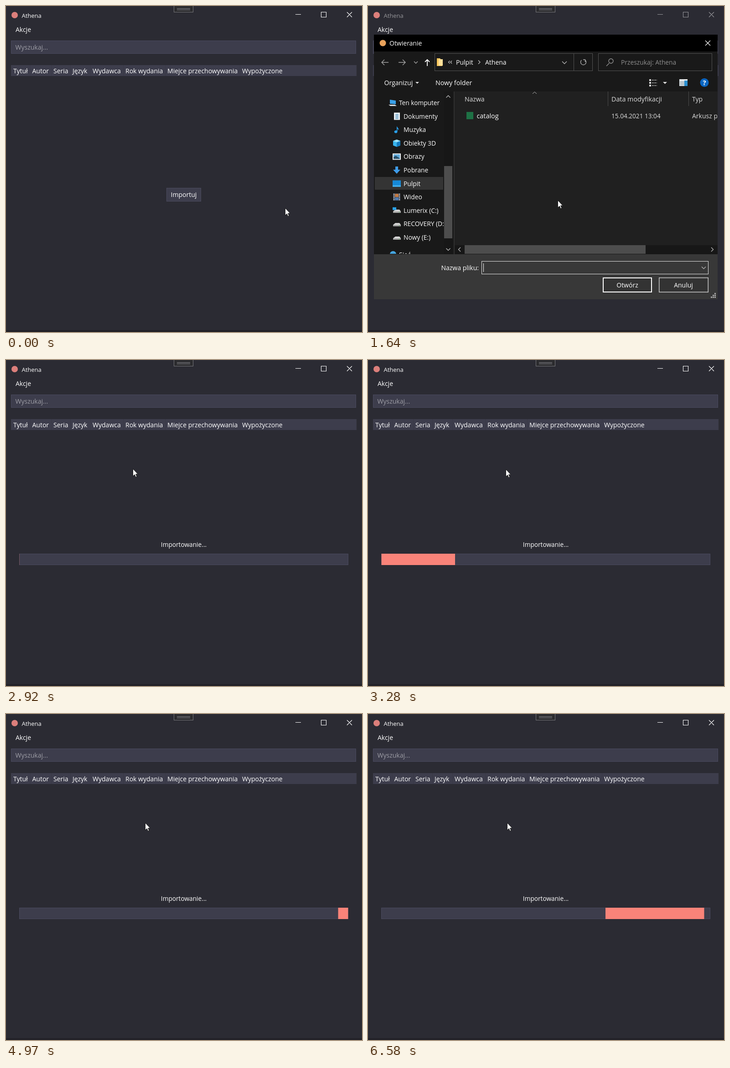
Recreate the animation shown at these times as an HTML page. Size 781 by 717 pixels, loop 6650 ms.

```html
<!DOCTYPE html>
<html lang="pl">
<head>
<meta charset="utf-8">
<title>Athena</title>
<style>
  html, body { margin: 0; width: 100%; height: 100%; overflow: hidden; background: #2b2b33; }
  svg { display: block; }
  text { font-family: "Open Sans", "Noto Sans", sans-serif; white-space: pre; }
</style>
</head>
<body>
<svg id="stage" width="781" height="717" viewBox="0 0 781 717"></svg>
<script>
const LOOP = 6650;
const ACCENT = '#f98379', LAYER = '#3d3d4c', EDGE = '#4a4a5e';

const text = (x, y, s, size = 14, fill = '#fff', more = '') =>
  `<text x="${x}" y="${y}" font-size="${size}" fill="${fill}" ${more}>${s}</text>`;
const rect = (x, y, w, h, fill, more = '') =>
  `<rect x="${x}" y="${y}" width="${w}" height="${h}" fill="${fill}" ${more}/>`;
const box = (x, y, w, h, fill, stroke, width = 1) =>
  rect(x + width / 2, y + width / 2, w - width, h - width, fill, `stroke="${stroke}" stroke-width="${width}"`);
const line = (d, stroke = '#fff', width = 1, more = '') =>
  `<path d="${d}" fill="none" stroke="${stroke}" stroke-width="${width}" ${more}/>`;
const shape = (d, fill, more = '') => `<path d="${d}" fill="${fill}" ${more}/>`;
const dot = (x, y, r, fill) => `<circle cx="${x}" cy="${y}" r="${r}" fill="${fill}"/>`;
const clip = (id, x, y, w, h) => `<clipPath id="${id}">${rect(x, y, w, h, '#000')}</clipPath>`;

function mainWindow() {
  const heads = [[16, 'Tytuł'], [57.5, 'Autor'], [104, 'Seria'], [146, 'Język'], [190, 'Wydawca'],
    [262, 'Rok wydania'], [354, 'Miejce przechowywania'], [518, 'Wypożyczone']];
  return rect(0, 0, 781, 717, '#2b2b33') +
    rect(0, 713, 781, 4, '#222128') +
    dot(19, 20, 7, '#dc7f7b') +
    `<g id="caption">${text(34.5, 25.5, 'Athena', 13, 'currentColor')}` +
    line('M635 18.5H647M691.5 13.5H702.5V24.5H691.5ZM748 13.5L759 24.5M759 13.5L748 24.5', 'currentColor', 1.1) + '</g>' +
    box(368, -2, 43, 16, '#2b2b2e', '#77777b') +
    line('M375 5.5H404M375 8.5H404', '#8b8b8f') +
    text(21, 57, 'Akcje') +
    box(11, 76, 757, 29, LAYER, EDGE) +
    text(20.5, 96, 'Wyszukaj...', 14, '#9d9da5') +
    rect(11, 130, 758, 24, LAYER) +
    heads.map(([x, s], i) => (i ? rect(x - 5, 130, 1, 24, '#383846') : '') + text(x, 147.5, s)).join('');
}

function importer() {
  return `<g id="button">${box(352, 400, 76, 30, LAYER, EDGE)}
    <rect id="hover" x="352" y="400" width="76" height="30" fill="#4b4b5d"/>
    <circle id="ripple" cx="416" cy="427" fill="${ACCENT}" clip-path="url(#btn)"/>
    ${text(390, 420, 'Importuj', 14, '#fff', 'text-anchor="middle"')}</g>
    <g id="progress">${text(390, 410.5, 'Importowanie...', 13.7, '#fff', 'text-anchor="middle"')}
    ${box(29, 426, 722, 25, LAYER, EDGE)}
    <rect id="bar" y="426" width="216.5" height="25" fill="${ACCENT}" clip-path="url(#track)"/></g>`;
}

// Sidebar icons, each drawn around its own centre
const drive = shape('M-8 2L-3 -2H6L9 2V5H-8Z', '#d8d8d8') + rect(-8, 2, 17, 3, '#a9a9a9') + rect(5, 3, 2, 1, '#4a4');
const icons = {
  pc: shape('M-6 -7L7 -5V3L-6 2Z', '#3aa0e8') + shape('M-9 4L5 4L9 7H-5Z', '#d5dbe0'),
  doc: rect(-6, -8, 13, 16, '#eef3f6') + line('M-3 -4H4M-3 -1H4M-3 2H4M-3 5H4', '#4d8fbd', 1.3),
  music: shape('M0 -8C1 -4 6 -3 4 2C4 -1 2 -2 1.500 -2V4A3.500 3 0 1 1 0 2Z', '#2aa1ee'),
  cube: shape('M0 -8L8 -5V5L0 8L-8 5V-5Z', '#39b5ee') + shape('M0 -2L8 -5V5L0 8Z', '#1379bd') + shape('M0 -8L8 -5L0 -2L-8 -5Z', '#9ce2fa'),
  image: rect(-9, -7, 18, 14, '#eef2f4') + rect(-7, -5, 14, 10, '#5fa9d8') + shape('M-7 5V1L-2 -2L7 4V5Z', '#28506a'),
  down: shape('M-3 -8H3V-1H8L0 8L-8 -1H-3Z', '#3e9be8'),
  desk: rect(-9, -7, 18, 14, '#1689d8') + rect(-9, 4, 18, 3, '#49b5f2'),
  film: rect(-8, -8, 16, 16, '#3e4654') + rect(-4, -7, 8, 7, '#c27b45') + rect(-4, 1, 8, 6, '#507bb0') +
    line('M-6 -7V8M6 -7V8', '#ddd', 2, 'stroke-dasharray="2 2"'),
  system: drive + rect(-9, -7, 8, 6, '#2aa4ee'),
  drive,
  net: dot(1, 0, 7, '#45a5df') + shape('M-9 3H0V9H-9Z', '#d5dbe0')
};

function sidebar() {
  const items = [['doc', 'Dokumenty'], ['music', 'Muzyka'], ['cube', 'Obiekty 3D'], ['image', 'Obrazy'],
    ['down', 'Pobrane'], ['desk', 'Pulpit'], ['film', 'Wideo'], ['system', 'Lumerix (C:)'],
    ['drive', 'RECOVERY (D:)'], ['drive', 'Nowy (E:)']];
  const icon = (name, x, y) => `<g transform="translate(${x} ${y})">${icons[name]}</g>`;
  return rect(15, 188, 173, 358, '#191919') + '<g clip-path="url(#side)">' +
    rect(15, 376, 150, 28, '#343434') +
    icon('pc', 54, 213) + text(68, 218, 'Ten komputer', 13.7) +
    items.map(([name, s], i) => {
      const y = 242.5 + i * 29.6;
      return icon(name, 63, y) + text(78, y + 5, s, 13.8);
    }).join('') +
    icon('net', 54, 546) + text(68, 552, 'Sieć') + '</g>' +
    rect(167, 188, 19, 358, '#171717') + rect(167, 352, 18, 159, '#4d4d4d') +
    line('M171.500 201.500L176 197L180.500 201.500M171.500 533L176 537.500L180.500 533', '#bbb', 1.3) +
    rect(188, 188, 2, 358, '#303030');
}

function navigation() {
  return rect(13, 63, 754, 37, '#000') + dot(32.5, 81.5, 7, '#e9a25b') +
    text(47, 86.500, 'Otwieranie') +
    line('M740 76L751 87M751 76L740 87', '#fff', 1.2) +
    line('M45 124H30M36 118L30 124L36 130M67 124H82M76 118L82 124L76 130', '#a5a5a5', 1.4) +
    line('M101 122L105 126L109 122', '#aaa', 1.3) +
    line('M130 132V118M125 123L130 118L135 123', '#fff', 1.8) +
    box(146, 104, 347, 39, '#191919', '#535353') + box(505, 104, 250, 39, '#191919', '#535353') +
    line('M451.500 105V142', '#535353') +
    shape('M151 115H158L160 118H163V132H151Z', '#f7c65c') + shape('M155 117H164V131H155Z', '#ffe09a') +
    line('M179.500 120.500L176.500 123.500L179.500 126.500M184 120.500L181 123.500L184 126.500M242 119.500L246 123.500L242 127.500', '#ccc', 1.2) +
    text(193, 129, 'Pulpit') + text(257, 129, 'Athena') +
    line('M426 122L431 127L436 122', '#bbb', 1.3) +
    line('M476.500 119A6 6 0 1 1 468.500 119M476.500 123V118H472', '#aaa', 1.4) +
    line('M529 126L523 132M538 121A5 5 0 1 1 528 121A5 5 0 1 1 538 121', '#999', 1.3) +
    text(555, 129, 'Przeszukaj: Athena', 13.8, '#8f8f8f') +
    text(35.500, 174, 'Organizuj') + shape('M104 167H112L108 171Z', '#ddd') +
    text(148, 174, 'Nowy folder', 14.2) +
    [0, 6, 12].map(d => rect(617, 161 + d, 4, 4, '#ddd')).join('') +
    line('M623 163H634M623 169H634M623 175H634', '#aaa', 1.500, 'stroke-dasharray="4 1"') +
    shape('M647 167H656L651.500 171.500Z', '#ddd') +
    rect(683, 161, 18, 15, '#e9eef1') + rect(684, 165, 10, 10, '#b9c6cd') + rect(694, 164, 7, 12, '#2a8fd0') +
    dot(738, 168.500, 9.500, '#0a66c2') + text(738, 174, '?', 15, '#fff', 'text-anchor="middle" font-weight="700"');
}

function fileList() {
  return rect(190, 188, 577, 358, '#202020') +
    line('M361 193L365.500 189L370 193', '#bbb') +
    line('M526.500 188V220M703.500 188V220', '#4b4b4b') +
    text(212, 209.500, 'Nazwa', 14, '#ddd') + text(534, 209.500, 'Data modyfikacji', 14.3, '#ddd') +
    text(711, 209.500, 'Typ', 14, '#ddd') +
    '<rect id="row" x="209" y="228" width="558" height="27"/>' +
    rect(216, 233, 15, 16, '#1e7145') +
    '<g clip-path="url(#list)">' + text(238.500, 247, 'catalog', 14.400) +
    text(534, 247, '15.04.2021 13:04', 13.600, '#ddd') + text(711, 247, 'Arkusz programu', 14, '#ddd') + '</g>' +
    rect(190, 526, 577, 20, '#171717') + rect(212, 526, 397, 19, '#4d4d4d') +
    line('M203 531L198.500 535.500L203 540M753 531L757.500 535.500L753 540', '#bbb', 1.3);
}

function footer() {
  const label = 'text-anchor="middle"';
  const grip = [[0, 2], [1, 1], [1, 2], [2, 0], [2, 1], [2, 2]];
  return rect(13, 546, 754, 99, '#383838') +
    text(243, 581, 'Nazwa pliku:', 14, '#fff', 'text-anchor="end"') +
    box(249, 561, 498, 29, '#383838', '#e4e4e4') +
    line('M732 573.500L736.500 578L741 573.500', '#bbb', 1.2) +
    text(253, 581, 'catalog', 14, '#fff', 'id="file"') +
    '<rect id="caret" x="253" y="566" width="1" height="19" fill="#fff"/>' +
    box(515, 597, 108, 33, '#333', '#fff', 2) + text(569, 618.500, 'Otwórz', 14, '#fff', label) +
    box(638, 597, 109, 33, '#333', '#c8c8c8', 1.500) + text(692, 618.500, 'Anuluj', 14, '#fff', label) +
    grip.map(([x, y]) => rect(752 + x * 4, 631 + y * 4, 3, 3, '#a8a8a8')).join('');
}

const stage = document.getElementById('stage');
stage.innerHTML = '<defs>' + clip('btn', 352, 400, 76, 30) + clip('track', 29.500, 426, 721, 25) +
  clip('side', 15, 188, 151, 357) + clip('list', 190, 188, 576, 338) + '</defs>' +
  mainWindow() + importer() +
  `<g id="dialog">${rect(13, 63, 754, 582, '#191919')}${navigation()}${sidebar()}${fileList()}${footer()}</g>` +
  '<path id="cursor" d="M.5 .5V16.500L4.200 13L6.600 18.500L9 17.500L6.600 12H11.300Z" fill="#fff" stroke="#111" stroke-width=".9"/>';

const el = {};
stage.querySelectorAll('[id]').forEach(node => el[node.id] = node);
const show = (node, on) => node.setAttribute('display', on ? 'inline' : 'none');

// Share of a move done at t, in n jumps between the first and last change
function jumps(t, first, last, n) {
  if (t < first) return 0;
  const k = n > 1 ? Math.floor((t - first) / (last - first) * (n - 1) + 0.01) + 1 : 1;
  return Math.min(1, k / n);
}
const ease = p => p * p * (3 - 2 * p);

const moves = [
  [460, 880, 7, 416, 427],
  [1840, 2310, 8, 276, 239],
  [2850, 3210, 6, 302, 240],
  [3350, 3350, 1, 305, 239]
];
function pointer(t) {
  let x = 612, y = 444;
  for (const [first, last, n, toX, toY] of moves) {
    const p = ease(jumps(t, first, last, n));
    x += (toX - x) * p;
    y += (toY - y) * p;
  }
  return [Math.round(x), Math.round(y)];
}

// Left edge of the bar per tick, running on past the end of the track
const path = [[-5.1, -187], [0, -25.500], [9, 255], [14, 412], [35, 1077], [39, 1209], [47, 1459]];
function barLeft(t) {
  const n = Math.floor((t - 3276) / 70.2);
  if (n < -5) return -187;
  let i = 1;
  while (i < path.length - 1 && n > path[i][0]) i++;
  const [a, u] = path[i - 1], [b, v] = path[i];
  const x = u + (v - u) * (n - a) / (b - a);
  return x > 751 ? x - 938 : x;
}

function draw(t) {
  const [x, y] = pointer(t);
  el.cursor.setAttribute('transform', `translate(${x} ${y})`);

  const active = t < 1370 || t >= 2920;
  el.caption.setAttribute('color', active ? '#fff' : '#97979b');

  const importing = t >= 2920;
  show(el.button, !importing);
  show(el.progress, importing);
  show(el.hover, x < 428 && y < 430 && t < 1500);
  el.ripple.setAttribute('r', 76 * jumps(t, 1080, 1220, 3));
  el.bar.setAttribute('x', barLeft(t));

  show(el.dialog, t >= 1500 && t < 2850);
  el.dialog.setAttribute('opacity', t < 1570 ? 0.45 : t < 1640 ? 0.85 : 1);
  const picked = t >= 2710;
  const over = y >= 228 && y < 255;
  el.row.setAttribute('fill', picked ? '#777' : over ? '#4d4d4d' : '#202020');
  show(el.file, picked);
  show(el.caret, !picked && (t < 2050 || t >= 2580));
}

const start = performance.now();
function tick() {
  draw((performance.now() - start) % LOOP);
  requestAnimationFrame(tick);
}
tick();
</script>
</body>
</html>
```
